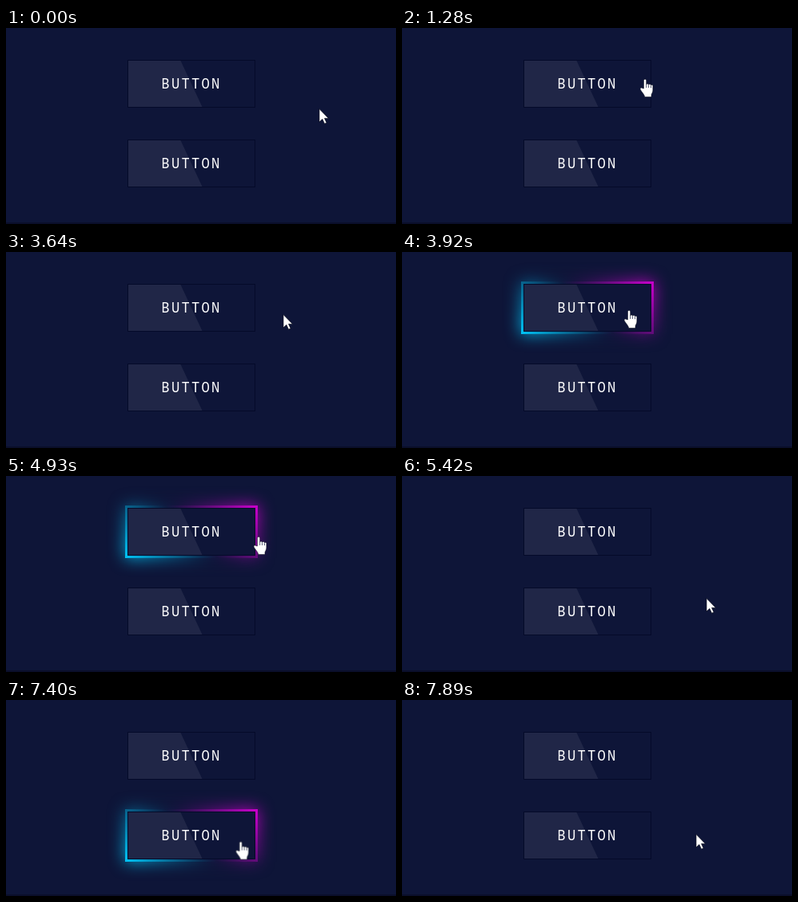
Recreate the animation shown at these times as an HTML page. Size 488 by 246 pixels, loop 8 s.

```html
<!DOCTYPE html>
<html lang="en">
<head>
<meta charset="utf-8">
<title>Glowing buttons</title>
<style>
:root { --bg: #0e1538; --loop: 8000ms; }
html, body { margin: 0; width: 100%; height: 100%; overflow: hidden; background: var(--bg); }
.stage { position: relative; width: 488px; height: 246px; overflow: hidden; background: var(--bg); }
.floor { position: absolute; left: 0; right: 0; bottom: 0; height: 2px; background: #0a0f2a; }

.button { position: absolute; left: 152px; top: 40px; width: 160px; height: 60px; }
.button.lower { top: 140px; }

.glow { position: absolute; inset: 0; animation: glow-upper var(--loop) step-end infinite; }
.lower .glow { animation-name: glow-lower; }
.glow::before, .glow::after {
  content: ""; position: absolute; inset: -3px;
  background: linear-gradient(45deg, #00ccff, var(--bg), #d400d4);
}
.glow::after { filter: blur(10px); }

.face {
  position: absolute; inset: 0; box-sizing: border-box; overflow: hidden;
  border: 1px solid #040a29; background: var(--bg); color: #fff;
  font: 17.2px/58px "Noto Sans Mono", "DejaVu Sans Mono", monospace;
  letter-spacing: 2.24px; text-align: center;
}
.face::before {
  content: ""; position: absolute; top: 0; left: -50%; width: 100%; height: 100%;
  background: rgba(255, 255, 255, .075); transform: skewX(25deg);
}
.face span { position: relative; }

.cursor {
  position: absolute; left: 0; top: 0; width: 1px; height: 1px; overflow: visible;
  animation: travel var(--loop) infinite;
}
.arrow { animation: arrow var(--loop) step-end infinite; }
.hand { animation: hand var(--loop) step-end infinite; }

/* The pointer advances once every 70 ms. */
@keyframes travel {
  0% { transform: translate(392px, 101px); }
  9% { transform: translate(392px, 101px); animation-timing-function: steps(9, start); }
  16.875% { transform: translate(304px, 64px); animation-timing-function: steps(3, start); }
  19.5% { transform: translate(273px, 62px); animation-timing-function: steps(1, start); }
  20.375% { transform: translate(270px, 62px); }
  29.375% { transform: translate(270px, 62px); animation-timing-function: steps(3, start); }
  32% { transform: translate(340px, 62px); animation-timing-function: steps(4, start); }
  35.5%, 37.875% { transform: translate(403px, 61px); animation-timing-function: steps(3, start); }
  40.5%, 42.875% { transform: translate(429px, 73px); animation-timing-function: steps(4, start); }
  46.375% { transform: translate(347px, 78px); animation-timing-function: steps(4, start); }
  49.875%, 58.125% { transform: translate(284px, 73px); animation-timing-function: steps(5, start); }
  62.5% { transform: translate(316px, 76px); animation-timing-function: steps(3, start); }
  65.125% { transform: translate(362px, 108px); animation-timing-function: steps(3, start); }
  67.75% { transform: translate(386px, 147px); animation-timing-function: steps(1, start); }
  68.625% { transform: translate(381px, 153px); animation-timing-function: steps(10, start); }
  77.375% { transform: translate(314px, 177px); animation-timing-function: steps(2, start); }
  79.125% { transform: translate(296px, 179px); animation-timing-function: steps(3, start); }
  81.75%, 92.5% { transform: translate(283px, 179px); animation-timing-function: steps(8, start); }
  99.5%, 100% { transform: translate(368px, 168px); }
}
@keyframes hand {
  0%, 31.125%, 62.5%, 95.125%, 100% { opacity: 0; }
  16%, 48.125%, 77.375% { opacity: 1; }
}
@keyframes arrow {
  0%, 31.125%, 62.5%, 95.125%, 100% { opacity: 1; }
  16%, 48.125%, 77.375% { opacity: 0; }
}
@keyframes glow-upper {
  0%, 31.125%, 62.5%, 100% { opacity: 0; }
  16.875%, 49% { opacity: 1; }
}
@keyframes glow-lower {
  0%, 95.125%, 100% { opacity: 0; }
  78.25% { opacity: 1; }
}
</style>
</head>
<body>
<div class="stage">
  <div class="floor"></div>
  <div class="button"><div class="glow"></div><div class="face"><span>BUTTON</span></div></div>
  <div class="button lower"><div class="glow"></div><div class="face"><span>BUTTON</span></div></div>
  <svg class="cursor" viewBox="0 0 1 1">
    <path class="arrow" d="M0 .5V17L3.9 13.4L6.6 19.2L9.2 18L6.6 12.4H11.6Z"
      fill="#fff" stroke="#050817" stroke-width=".7"/>
    <g class="hand">
      <path fill="#fff" stroke="#050817" stroke-width=".5" d="M-1.5 12V1.8a1.6 1.6 0 0 1 3.2 0V7
        a1.5 1.5 0 0 1 2.9 .4a1.5 1.5 0 0 1 2.9 .7a1.3 1.3 0 0 1 2.4 1V14
        c0 3-1.7 4-1.9 6v2.5H-.3c0-2.4-2.8-5-5.3-9c-1-2 .8-3 2-2Z"/>
      <path fill="none" stroke="#0e1538" stroke-width=".7" d="M1.7 7v4M4.6 7.6V11M7.5 8.3V11.2"/>
    </g>
  </svg>
</div>
</body>
</html>
```
